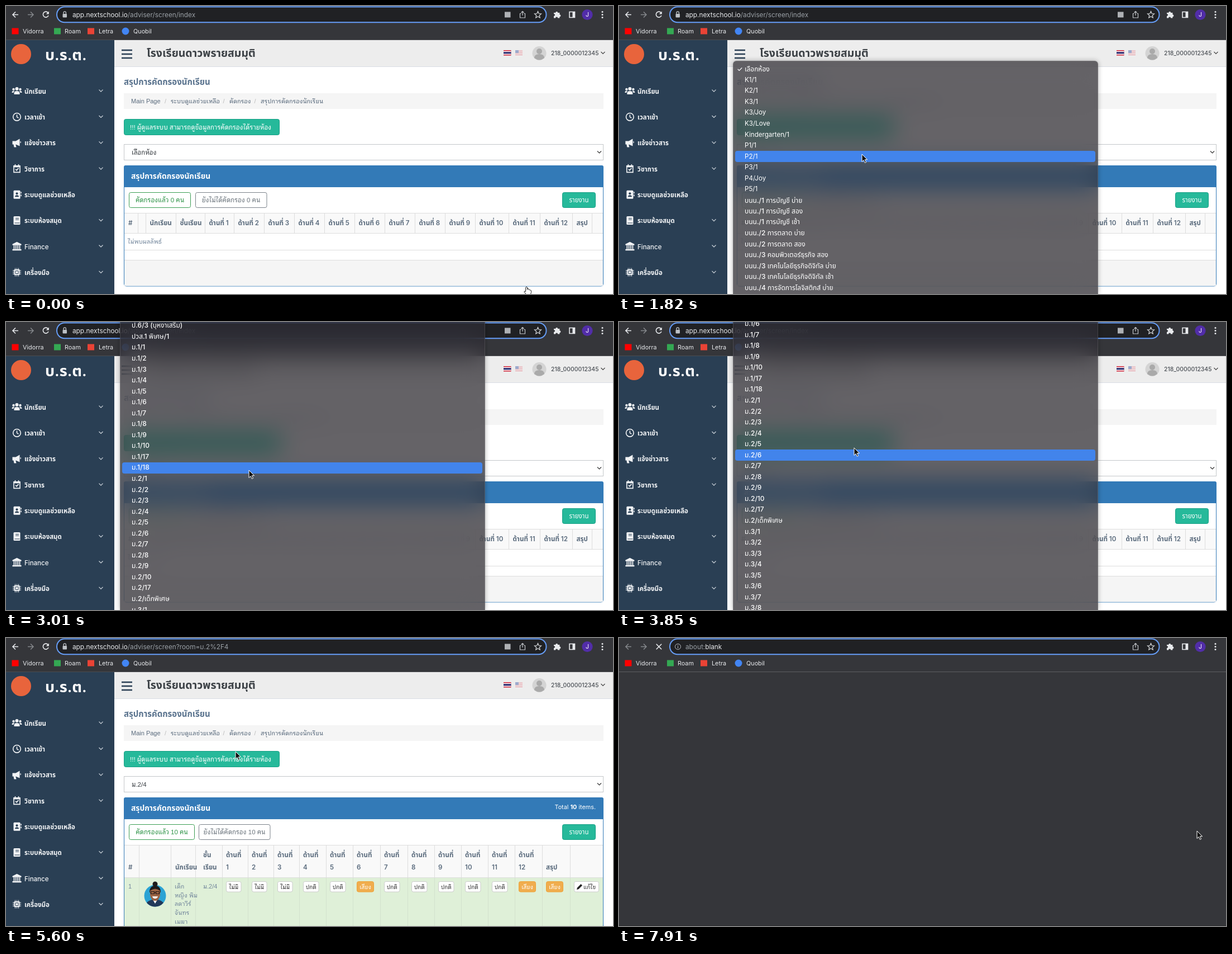
These frames come from a looping animation (1087x515 px, 8 s). An HTML page:

```html
<!DOCTYPE html>
<html lang="th">
<head>
<meta charset="utf-8">
<title>สรุปการคัดกรองนักเรียน</title>
<style>
html, body { margin: 0; width: 100%; height: 100%; overflow: hidden; background: #fff; }
body { position: relative; font-family: Inter, "Noto Sans Thai", "Noto Sans", sans-serif; }
svg { position: absolute; left: 0; top: 0; }
text { white-space: pre; }
.loop { font-family: "Liberation Sans", "Noto Sans Thai Looped", "Noto Looped Thai", "Noto Sans Thai", sans-serif; }
#menu {
  position: absolute; left: 204px; width: 652px; overflow: hidden; color: #fff;
  border: 1px solid rgba(255,255,255,.12); border-bottom: 0; border-radius: 6px 6px 0 0;
  background: rgba(45,43,49,.733); backdrop-filter: blur(22px) saturate(1.6);
  box-shadow: 0 0 8px rgba(0,0,0,.3);
}
#menu.fading { backdrop-filter: none; }
#pick { position: absolute; left: 3px; width: 645px; height: 20px; border-radius: 4px; background: #4284eb; }
#list { position: absolute; left: 20px; top: 0; white-space: nowrap; font-size: 11.6px; line-height: 19.55px; }
#list div { height: 19.55px; }
#list .thai { font-size: 12px; font-weight: 500; }
#list div:first-child::before { content: "✓"; position: absolute; left: -14px; }
</style>
</head>
<body>
<svg id="stage" width="1087" height="515"></svg>
<div id="menu"><div id="pick"></div><div id="list"></div></div>
<svg id="pointer" width="1087" height="515">
  <path id="arrow" d="M0 0V13.5L3.1 10.6L5.3 15.4L7.6 14.4L5.4 9.7H9.6Z" fill="#111" stroke="#fff" stroke-width="1"/>
  <path id="hand" d="M-1.4 1.2Q0-1 1.4 1V5.2Q3-.2 4.2 5.6Q5.8 4.2 6.6 6.3Q8.3 5.4 8.5 7.4V10.5L7 14.5H.2L-4 9.3Q-4.4 7-1.4 8.6Z" fill="#fff" stroke="#222" stroke-width="1"/>
</svg>
<script>
const $ = id => document.getElementById(id);
const text = (x, y, s, size, fill, more = '') =>
  `<text x="${x}" y="${y + size * .36}" font-size="${size}" fill="${fill}" ${more}>${s}</text>`;
const rect = (x, y, x2, y2, fill, more = '') =>
  `<rect x="${x}" y="${y}" width="${x2 - x}" height="${y2 - y}" fill="${fill}" ${more}/>`;
const box = (x, y, x2, y2, fill, stroke, r = 0, more = '') =>
  rect(x + .5, y + .5, x2 - .5, y2 - .5, fill, `stroke="${stroke}" rx="${r}" ${more}`);
const dot = (x, y, r, fill, more = '') => `<circle cx="${x}" cy="${y}" r="${r}" fill="${fill}" ${more}/>`;
const line = (d, color, w = 1) => `<path d="${d}" fill="none" stroke="${color}" stroke-width="${w}"/>`;
const shape = (d, fill) => `<path d="${d}" fill="${fill}"/>`;
const group = (id, body) => `<g id="${id}">${body}</g>`;
const chevron = (x, y, color) => line(`M${x - 3.5} ${y - 2}l3.5 3.5l3.5-3.5`, color, 1.2);
const loop = 'class="loop"', bold = 'font-weight="600"', medium = 'font-weight="500"';
const mid = 'text-anchor="middle"', end = 'text-anchor="end"';

const pale = '#e8eaed', dim = '#9aa0a6', navy = '#2a3f54', teal = '#26b99a', deep = '#169f85', blue = '#337ab7';
const ink = '#5a6b7d', rule = '#dddddd';

function toolbar() {
  const marks = [['Vidorra', 30, 16.5, '#f00'], ['Roam', 105, 92, '#34a853'],
                 ['Letra', 166, 152, '#ea4335'], ['Quobil', 228, 214, '#4285f4']];
  const back = 'M22 15.5H12.5M17 10.5l-5 5l5 5', next = 'M39 15.5h9.5M44 10.5l5 5l-5 5';
  return rect(0, 0, 1087, 61, '#35363a') + rect(0, 60, 1087, 61, '#4b4c50') +
    rect(91, 1.5, 967.5, 29.3, '#202124', 'rx="13.9" stroke="#669df6" stroke-width="2"') +
    line(next, '#85888c', 1.5) +
    marks.map(([s, x, cx, c], i) => (i == 3 ? dot(cx, 45, 6.5, c) : rect(cx - 6, 39.5, cx + 6, 50.5, c)) +
      text(x, 45, s, 10.8, pale)).join('') +
    line('M922.5 13.5h-2v7.5h9v-7.5h-2M925 17V9.5M922.5 12l2.5-2.5l2.5 2.5', '#c4c7cb', 1.2) +
    line('M952.5 9.5l1.7 4l4.3.4l-3.3 2.8l1 4.3l-3.7-2.3l-3.7 2.3l1-4.3l-3.3-2.8l4.3-.4z', '#d4d7da', 1.2) +
    shape('M981 12h3.2a2 2 0 1 1 4 0h3.2v3.2a2 2 0 1 1 0 4v2.3h-3.3a2 2 0 0 0-4 0H981v-3.4a2 2 0 0 0 0-4z', pale) +
    line('M1009 10.5h9.5v10h-9.5z', pale, 1.6) + rect(1014.5, 10, 1019, 21, pale) +
    dot(1041, 15.5, 9.6, '#512da8') + text(1041, 15.5, 'J', 10.5, '#fff', mid) +
    [10.5, 15.5, 20.5].map(y => dot(1068, y, 1.5, pale)).join('') +
    group('live', line(back, pale, 1.6) + rect(101.5, 14, 109, 20.5, '#bdc1c6', 'rx="1"') +
      line('M103 14v-2a2.2 2.2 0 0 1 4.4 0v2', '#bdc1c6', 1.3) + rect(893, 10.5, 903.5, 20.5, '#aeb1b5')) +
    group('idle', line(back, '#85888c', 1.5) + dot(105.5, 15.5, 5, 'none', 'stroke="#bdc1c6"') +
      rect(105, 14.5, 106, 18.5, '#bdc1c6') + rect(105, 12.3, 106, 13.5, '#bdc1c6')) +
    group('reload', line('M75.5 12.3A5 5 0 1 0 76 17', pale, 1.6) + shape('M76.8 9.5v5h-5z', pale)) +
    group('stop', line('M66.8 10.8l9.4 9.4M76.2 10.8l-9.4 9.4', pale, 1.6)) +
    text(119, 15.5, '', 11.8, pale, 'id="url"');
}

function sidebar() {
  const w = '#f2f4f6';
  const items = ['นักเรียน', 'เวลาเข้า', 'แจ้งข่าวสาร', 'วิชาการ', 'ระบบดูแลช่วยเหลือ', 'ระบบห้องสมุด', 'Finance', 'เครื่องมือ'];
  const icons = [
    dot(0, -4, 3, w) + dot(-6, -3, 2.2, w) + dot(6, -3, 2.2, w) +
      shape('M-5 6V4q0-4 5-4t5 4v2zM-9 3q0-4 5-3q-2 1-2 3zM9 3q0-4-5-3q2 1 2 3z', w),
    dot(0, 0, 6.8, 'none', `stroke="${w}" stroke-width="1.6"`) + line('M0-4V0l3 2', w, 1.5),
    shape('M-8-3h6L5-7V6L-2 3v1l1 4h-4l-1-5h-2zM6-3q3 2 0 4z', w),
    line('M-5.5-5h11v11.5h-11zM-3-8v3M3-8v3M-2.5 1l2 2l3.5-4', w, 1.6) + rect(-6, -5, 6, -2.5, w),
    rect(-6, -7.5, 6, 7.5, w, 'rx="1.5"') + dot(0, -2, 2, navy) + shape('M-3.5 4q0-3 3.5-3t3.5 3z', navy) + line('M7.5-5v3M7.5 0v3', w, 1.5),
    rect(-6, -7.5, 6, 7.5, w, 'rx="1.5"') + line('M-2.5-4h6M-2.5-1.5h6M-4 4.5H5', navy, 1.2),
    shape('M0-8L8-4v2H-8v-2zM-8 5H8v2.5H-8z', w) + line('M-5-2v7M-1.7-2v7M1.7-2v7M5-2v7', w, 1.8),
    rect(-5, -5, 5, 5, w, 'rx="1"') + line('M-7.5-3h15M-7.5 0h15M-7.5 3h15M-3-7.5v15M0-7.5v15M3-7.5v15', w, 1) +
      line('M-2.5-2.5h5v5h-5z', navy, 1)];
  return rect(0, 61, 194, 515, navy) + dot(27, 86, 18, '#e8643c') + text(70, 87.5, 'บ.ร.ต.', 27, '#fff', bold) +
    items.map((s, i) => {
      const y = 152.7 + i * 46.3;
      return `<g transform="translate(19.5 ${y - .7})">${icons[i]}</g>` +
        text(33, y, s, 11.5, '#f2f4f6', s == 'Finance' ? medium : bold) + (i == 4 ? '' : chevron(170, y - 1, '#cfd6dd'));
    }).join('');
}

function head() {
  const crumbs = [['Main Page', 224], ['/', 284], ['ระบบดูแลช่วยเหลือ', 295], ['/', 388.5],
                  ['คัดกรอง', 400], ['/', 444.5], ['สรุปการคัดกรองนักเรียน', 456]];
  return rect(194, 61, 1087, 515, '#fff') + rect(194, 61, 1087, 108, '#ededed') + rect(194, 108, 1087, 109, '#d9dee4') +
    line('M207 79h19M207 86h19M207 93h19', navy, 2.5) + text(252, 84, 'โรงเรียนดาวพรายสมมุติ', 19.5, '#3d4247', bold) +
    rect(891, 79, 904.5, 88.5, '#d0283c') + rect(891, 80.6, 904.5, 86.9, '#fff') + rect(891, 82.2, 904.5, 85.4, '#2d2a6e') +
    `<g opacity=".45">${rect(912, 79, 925, 88.5, '#fff')}${line('M912 80h13M912 82.5h13M912 85h13M912 87.5h13', '#d0283c', 1.2)}${rect(912, 79, 918, 84, '#3c5aa8')}</g>` +
    dot(955, 84.5, 12.5, '#d4d4d4') + dot(955, 81, 5, '#aaa') + shape('M946 93q0-7 9-7t9 7q-9 7-18 0z', '#aaa') +
    text(976, 84, '218_0000012345', 10.4, '#4a4f55', medium) + chevron(1069, 84, '#444') +
    text(211, 136, 'สรุปการคัดกรองนักเรียน', 15, '#5a738e', bold) + rect(211, 156, 1070, 184, '#f5f5f5') +
    crumbs.map(([s, x]) => text(x, 170, s, 11, s == '/' ? '#bbb' : ink, loop)).join('') +
    box(211, 202, 490, 231, teal, deep, 3) +
    text(222, 217, '!!! ผู้ดูแลระบบ สามารถดูข้อมูลการคัดกรองได้รายห้อง', 11.5, '#fff', loop + ' ' + medium) +
    box(211, 247, 1070, 276, '#fff', '#c4c7ca') + chevron(1062.5, 261.5, '#333') +
    text(225, 262, '', 11.5, '#3a3f44', loop + ' id="room"');
}

function panel(n, y2) {
  const x = n ? 338 : 331, x2 = n ? 345 : 339;
  return box(211, 285, 1070, y2, '#fff', blue, 4) + rect(211, 285, 1070, 324, blue, 'rx="3"') + rect(211, 318, 1070, 324, blue) +
    text(224, 304, 'สรุปการคัดกรองนักเรียน', 13.8, '#fff', bold) +
    box(220, 333, x, 361, '#fff', '#3a9d52', 3) + text((220 + x) / 2, 347, `คัดกรองแล้ว ${n} คน`, 11.5, '#2f9448', loop + ' ' + mid) +
    box(x2, 333, x2 + 128.5, 361, '#fff', '#7b828a', 3) + text(x2 + 64, 347, `ยังไม่ได้คัดกรอง ${n} คน`, 11.5, '#6c757d', loop + ' ' + mid) +
    box(996, 333, 1056, 361, teal, deep, 3, n ? 'id="report"' : '') + text(1026, 347, 'รายงาน', 11.5, '#fff', mid + ' ' + medium);
}

const verticals = (xs, y, y2, c = rule) => line(xs.map(x => `M${x + .5} ${y}V${y2}`).join(''), c);

function emptyTable() {
  const cols = [236, 250, 304, 356, 408, 462, 516, 570, 624, 678, 732, 786, 840, 900, 956, 1014, 1049];
  const names = ['#', '', 'นักเรียน', 'ชั้นเรียน', ...Array.from({ length: 12 }, (_, i) => 'ด้านที่ ' + (i + 1)), 'สรุป'];
  return panel(0, 501.5) + rect(212, 370, 1069, 406, '#f9f9f9') + verticals(cols, 370, 406) +
    names.map((s, i) => text(i ? cols[i - 1] + 7.5 : 219, 388, s, 11.6, ink, bold)).join('') +
    line('M212 370.5H1069M212 406.5H1069M212 436.5H1069M212 454.5H1069', rule) + rect(212, 455, 1069, 500.5, '#f5f5f5') +
    text(218, 421.5, 'ไม่พบผลลัพธ์', 11, '#73879c', loop);
}

function badge(x, w, s, warn) {
  return box(x, 435, x + w, 454.5, warn ? '#f0ad4e' : '#fff', warn ? '#eea236' : '#ccc', 3) +
    text(x + w / 2, 445, s, 10, warn ? '#fff' : '#333', mid + ' ' + loop);
}

function filledTable() {
  const cols = [238, 295, 339, 387, 433, 479, 525, 573, 621, 670, 719, 767, 815, 863, 911, 960, 1010];
  const face = dot(267, 461, 19.5, '#2ba3d4') +
    shape('M252 473.5q5-6 15-6t15 6q-6 7-15 7t-15-7z', '#22395a') + shape('M263 468h8l-4 7z', '#fff') +
    dot(267, 440, 4.5, '#1d1a1c') + shape('M257 455q0-12 10-12t10 12z', '#1d1a1c') +
    shape('M258 452q9-7 18 0v8q-2 10-9 10t-9-10z', '#9c6443') +
    line('M259.5 453.5h6v4h-6zM268.5 453.5h6v4h-6zM265.5 455h3', '#221a18', 1.2) + shape('M262 462h10q-1 4-5 4t-5-4z', '#fff');
  const sides = cols.slice(3, 15).map((c, i) => {
    const x = c + 7, warn = i == 5 || i == 11;
    return text(x, 388, 'ด้านที่', 11.6, ink, bold) + text(x, 410, i + 1, 11.6, ink, bold) +
      badge(x, warn ? 31 : i < 3 ? 27.5 : 28.5, warn ? 'เสี่ยง' : i < 3 ? 'ไม่มี' : 'ปกติ', warn);
  }).join('');
  return panel(10, 530) + text(1056, 302, 'Total <tspan font-weight="700">10</tspan> items.', 10.8, '#fff', end) +
    rect(212, 370, 1069, 428, '#f9f9f9') + rect(212, 428, 1069, 515, '#dff0d8') +
    verticals(cols, 370, 428) + verticals(cols, 428, 515, '#d3e2cd') + line('M212 370.5H1069M212 428.5H1069', rule) +
    [[219, 410, '#'], [303, 410, 'นักเรียน'], [353, 388, 'ชั้น'], [353, 410, 'เรียน'], [967, 410, 'สรุป']]
      .map(([x, y, s]) => text(x, y, s, 11.6, ink, bold)).join('') +
    sides + badge(967, 31, 'เสี่ยง', true) + badge(1017, 45, '    แก้ไข') +
    shape('M1022 450l1-3.5l6.5-6.5l2.5 2.5l-6.5 6.5z', '#222') +
    text(219, 444, '1', 11, '#73879c', loop) + face +
    ['เด็ก', 'หญิง พิม', 'ลดาวีร์', 'จันทร', 'เมฆา'].map((s, i) => text(302, 444 + i * 15.7, s, 11, '#73879c', loop)).join('') +
    text(353, 444, 'ม.2/4', 11, '#73879c', loop);
}

$('stage').innerHTML = group('page', head() + group('before', emptyTable()) + group('after', filledTable()) + sidebar()) +
  group('blank', rect(0, 61, 1087, 515, '#35363a') + rect(0, 514, 1087, 515, '#2b2c2f')) + toolbar() +
  group('edge', rect(0, 60, 1087, 61, '#5d5e61'));

const each = (pre, list, post = '') => list.split(' ').map(s => pre + s + post);
const shifts = (s, list) => each(s + ' ', list);
const rooms = ['เลือกห้อง', ...'K1/1 K2/1 K3/1 K3/Joy K3/Love Kindergarten/1 P1/1 P2/1 P3/1 P4/Joy P5/1'.split(' '),
  ...shifts('บนน./1 การบัญชี', 'บ่าย สอง เช้า'), ...shifts('บนน./2 การตลาด', 'บ่าย สอง'),
  'บนน./3 คอมพิวเตอร์ธุรกิจ สอง', ...shifts('บนน./3 เทคโนโลยีธุรกิจดิจิทัล', 'บ่าย เช้า'),
  ...shifts('บนน./4 การจัดการโลจิสติกส์', 'บ่าย สอง เช้า'), 'บนน./65', 'บสธ./65',
  ...each('ป.', '2/1 2/4 2/65 3/1 3/2 3/3 3/65 4/65 5/1 5/2 5/3 5/65 6/1 6/2 6/3', ' (บุหงาเสริม)'), 'ปวส.1 พิเศษ/1',
  ...each('ม.1/', '1 2 3 4 5 6 7 8 9 10 17 18'), ...each('ม.2/', '1 2 3 4 5 6 7 8 9 10 17 เด็กพิเศษ'),
  ...each('ม.3/', '1 2 3 4 5 6 7 8 9 10')];
$('list').innerHTML = rooms.map(s => `<div class="${/[ก-๙]/.test(s) ? 'thai' : ''}">${s}</div>`).join('');

// Monotone cubic through [time, value] keys.
function track(keys) {
  const slope = i => keys[i + 1] && keys[i] ? (keys[i + 1][1] - keys[i][1]) / (keys[i + 1][0] - keys[i][0]) : 0;
  const tangent = i => {
    const a = slope(i - 1), b = slope(i);
    return a * b > 0 ? 2 * a * b / (a + b) : 0;
  };
  return t => {
    let i = keys.findIndex(k => k[0] > t);
    if (i == 0) return keys[0][1];
    if (i < 0) return keys[keys.length - 1][1];
    const [t0, v0] = keys[--i], [t1, v1] = keys[i + 1], d = t1 - t0, u = (t - t0) / d, w = 1 - u;
    return v0 * (1 + 2 * u) * w * w + tangent(i) * d * u * w * w + v1 * u * u * (3 - 2 * u) - tangent(i + 1) * d * u * u * w;
  };
}
const curX = track([[70, 932], [900, 435], [3500, 435], [3850, 421], [4300, 411], [5750, 411], [6550, 1000], [6790, 1000], [7100, 1035]]);
const curY = track([[70, 502], [900, 265], [3500, 265], [3850, 225], [4300, 203], [5750, 203], [6550, 350], [6790, 350], [7100, 345]]);
const firstRow = track([[1330, 262], [1820, 113], [2450, -373], [3430, -896.3]]);
const pitch = 19.55, opens = 1050, fadeAt = 4760, fadeEnd = 5040, loads = 5600, blankAt = 7490;
const show = (id, on) => { $(id).style.display = on ? '' : 'none'; };
const site = '<tspan>app.nextschool.io</tspan><tspan fill="' + dim + '">/adviser/screen';
let address = '';

function draw() {
  const t = performance.now() % 8000, x = curX(t), y = curY(t);
  const loaded = t >= loads, blank = t >= blankAt;
  show('page', !blank); show('blank', blank); show('edge', blank);
  show('live', !blank); show('idle', blank);
  const busy = blank || t >= fadeEnd && !loaded;
  show('stop', busy); show('reload', !busy);
  show('before', !loaded); show('after', loaded);
  const url = blank ? `<tspan fill="${dim}">about:</tspan>blank` : site + (loaded ? '?room=ม.2%2F4' : '/index') + '</tspan>';
  if (url != address) $('url').innerHTML = address = url;
  $('room').textContent = loaded ? 'ม.2/4' : rooms[0];

  const menuOn = t >= opens && t < fadeEnd;
  show('menu', menuOn);
  if (menuOn) {
    const top = firstRow(t) - pitch / 2, edge = Math.max(-10, top - 5);
    const row = Math.floor((curY(t - 120) - top) / pitch);
    const menu = $('menu');
    menu.style.top = edge + 'px';
    menu.style.height = 514 - edge + 'px';
    menu.style.opacity = Math.min(1, (fadeEnd - t) / (fadeEnd - fadeAt));
    menu.classList.toggle('fading', t > fadeAt);
    $('list').style.transform = `translateY(${top - edge - 1}px)`;
    $('pick').style.top = Math.round(top + row * pitch) - edge - 1 + 'px';
  }

  const over = loaded && !blank && x > 994 && y > 333 && y < 361;
  $('report').setAttribute('fill', over ? deep : teal);
  const hand = t < 70 || over;
  show('hand', hand); show('arrow', !hand);
  $('pointer').style.transform = `translate(${x}px, ${y}px)`;
  requestAnimationFrame(draw);
}
$('pointer').style.overflow = 'visible';
draw();
</script>
</body>
</html>
```
